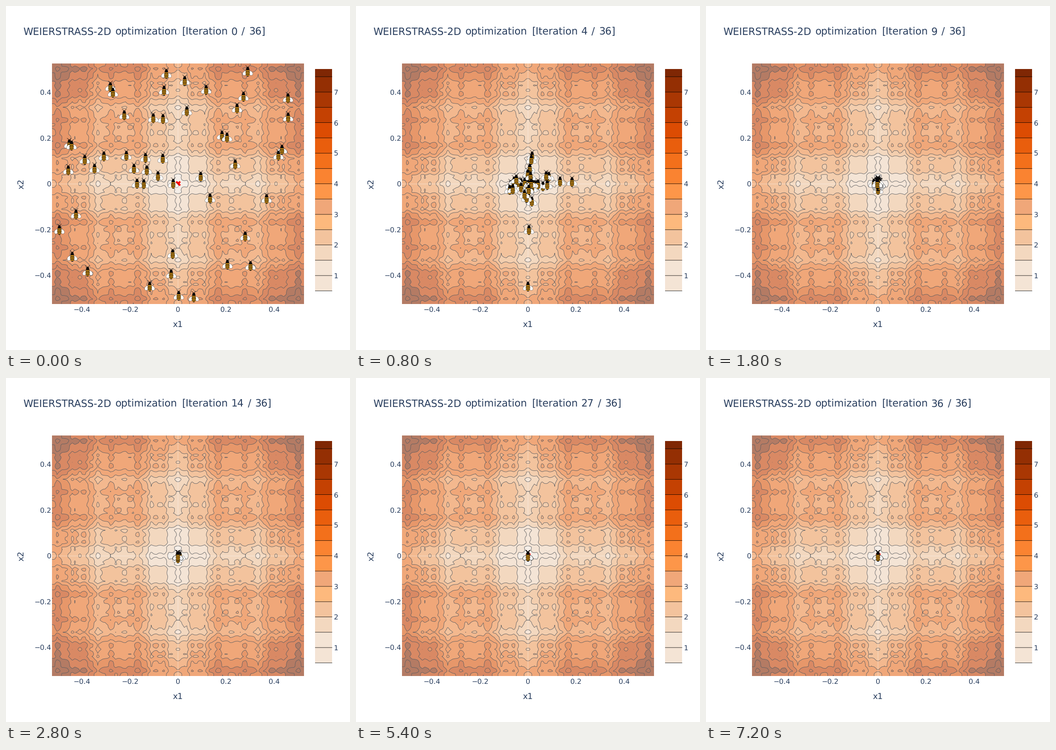
A matplotlib script for the animation above (7.4 s loop, 748 px wide and 748 px high).

```python
import numpy as np
import matplotlib.pyplot as plt
from matplotlib.animation import FuncAnimation
from matplotlib.collections import PathCollection
from matplotlib.colors import LinearSegmentedColormap
from matplotlib.patches import PathPatch, Polygon, Rectangle
from matplotlib.path import Path
from matplotlib.transforms import Affine2D

plt.rcParams["path.simplify"] = False
plt.rcParams["font.family"] = "DejaVu Sans"
plt.rcParams["text.hinting"] = "none"

SIZE, DPI = 748, 100
STEPS, STEP_MS = 36, 200
LEFT, RIGHT, TOP, BOTTOM = 100, 648, 125, 648
CX, CY, SX, SY = 373.9, 386.5, 522.2, 498.1
INK = "#2a3f5f"
PANEL = np.array([229, 236, 246]) / 255
OPACITY = 0.6
LEVELS = np.arange(0.5, 7.6, 0.5)


def pt(px):
    """Pixels to points."""
    return px * 72 / DPI


fig = plt.figure(figsize=(SIZE / DPI, SIZE / DPI), dpi=DPI, facecolor="white")
ax = fig.add_axes([0, 0, 1, 1])
ax.set_xlim(0, SIZE)
ax.set_ylim(SIZE, 0)
ax.axis("off")


def label(x, y, text, px, **kw):
    return ax.text(x, y, text, fontsize=pt(px), color=INK, va="baseline", **kw)


# ---------- colours ----------
oranges = LinearSegmentedColormap.from_list("oranges", [
    "#fff5eb", "#fee6ce", "#fdd0a2", "#fdae6b", "#fd8d3c",
    "#f16913", "#d94801", "#a63603", "#7f2704"], N=1024)
bands = oranges(np.linspace(0, 1, len(LEVELS) + 1))[:, :3]
muted = OPACITY * bands + (1 - OPACITY) * PANEL
for first, last in ((2, 3), (8, 9), (11, 12), (13, 15)):
    # Neighbouring bands share one tint.
    muted[first:last + 1] = muted[first:last + 1].mean(axis=0)
line_color = (1 - OPACITY) * PANEL


# ---------- Weierstrass surface ----------
def weierstrass(x, a=0.5, b=3, kmax=20):
    k = np.arange(kmax + 1)[:, None]
    waves = a**k * np.cos(2 * np.pi * b**k * (x + 0.5))
    floor = a**k * np.cos(np.pi * b**k)
    return (waves - floor).sum(axis=0)


def smooth_ring(p):
    """Closed centripetal Catmull-Rom curve through the points p."""
    p = p[np.hypot(*(p - np.roll(p, 1, axis=0)).T) > 1e-4]
    if len(p) < 3:
        return None
    d1 = np.roll(p, 1, axis=0) - p
    d2 = np.roll(p, -1, axis=0) - p
    a1 = np.sqrt(np.hypot(*d1.T))[:, None]
    a2 = np.sqrt(np.hypot(*d2.T))[:, None]
    num = a2**2 * d1 - a1**2 * d2
    before = p + num / (3 * a2 * (a1 + a2))
    after = p - num / (3 * a1 * (a1 + a2))
    curve = np.stack([after, np.roll(before, -1, axis=0),
                      np.roll(p, -1, axis=0)], axis=1).reshape(-1, 2)
    codes = [Path.MOVETO] + [Path.CURVE4] * len(curve)
    return Path(np.vstack([p[:1], curve]), codes)


def draw_surface():
    axis = np.linspace(-0.525, 0.525, 100)
    step = axis[1] - axis[0]
    w = weierstrass(axis)
    # One extra cell all round keeps closing edges outside the clip box.
    z = np.pad(w[None, :] + w[:, None], 1, mode="edge")
    wide = np.concatenate([[axis[0] - step], axis, [axis[-1] + step]])
    box = Rectangle((LEFT, TOP), RIGHT - LEFT, BOTTOM - TOP,
                    fc=muted[0], ec="none", zorder=1)
    ax.add_patch(box)
    for i, level in enumerate(LEVELS, 1):
        filled = ax.contourf(CX + SX * wide, CY - SY * wide, z, [level, 99])
        polygons = filled.get_paths()[0].to_polygons()
        filled.remove()
        rings = [r for r in map(smooth_ring, polygons) if r is not None]
        if rings:
            patch = PathPatch(Path.make_compound_path(*rings), fc=muted[i],
                              ec=line_color, lw=pt(0.85), zorder=1 + i / 100)
            ax.add_patch(patch)
            patch.set_clip_path(box)
    zero = dict(color="white", alpha=0.22, lw=pt(2), zorder=1.5,
                solid_capstyle="butt")
    ax.plot([LEFT, RIGHT], [CY, CY], **zero)
    ax.plot([CX, CX], [TOP, BOTTOM], **zero)


def draw_axes():
    for v in (-0.4, -0.2, 0, 0.2, 0.4):
        text = f"{v:g}".replace("-", "\u2212")
        label(CX + SX * v, 664.5, text, 15.2, ha="center")
        label(98.5, CY - SY * v + 5.5, text, 15.2, ha="right")
    label(CX, 698, "x1", 18.2, ha="center")
    label(38.5, CY, "x2", 18.2, ha="center", rotation=90,
          rotation_mode="anchor")


def draw_colorbar():
    def bar_y(v):
        return 586.1 - 66.5 * (v - 1)

    softened = {1: 2, 2: 3, 3: 4, 4: 6, 6: 9}
    for i, level in enumerate(LEVELS, 1):
        top = bar_y(min(level + 0.5, 7.75))
        color = muted[softened[i]] if i in softened else bands[i]
        ax.add_patch(Rectangle((672, top), 37.3, bar_y(level) - top,
                               fc=color, ec="none", zorder=2))
        ax.plot([672, 709.3], [bar_y(level)] * 2, color="black", snap=False,
                lw=pt(0.8), zorder=3, solid_capstyle="butt")
    for v in range(1, 8):
        label(712.5, bar_y(v) + 5.7, str(v), 15.2)


def draw_optimum():
    quarter = np.array([(0, 1), (1, 2), (2, 1)])
    turn = np.array([[0, -1], [1, 0]])
    cross = np.vstack([quarter @ np.linalg.matrix_power(turn, k)
                       for k in range(4)])
    ax.add_patch(Polygon(cross * 2.83 + (374.5, 386), fc="red", ec="none",
                         zorder=4))


# ---------- bees ----------
def ellipse(x, y, rx, ry, angle=0):
    move = Affine2D().scale(rx, ry).rotate_deg(angle).translate(x, y)
    return Path.unit_circle().transformed(move)


def stripe(y):
    half = 4.5 * np.sqrt(1 - ((y - 3.8) / 8.4)**2) - 0.2
    s = np.linspace(-1, 1, 9)
    arc = 0.6 * (1 - s**2)
    upper = np.column_stack([s * half, y - 1.2 + arc])
    lower = np.column_stack([s * half, y + 0.6 + arc])[::-1]
    return Path(np.vstack([upper, lower]))


def feeler(side):
    return Path([(side, -8), (side * 2.2, -10.3), (side * 5, -12)])


def bee_parts():
    """Path, fill, outline and outline width of each part, back to front."""
    black, outline, honey = "#0a0808", "#333333", "#ffb01a"
    parts = []
    for side in (-1, 1):
        wing = ellipse(side * 6.2, 4.6, 5.6, 4.1, side * 48)
        parts += [(wing, "white", outline, 0.4),
                  (feeler(side), "none", black, 0.7)]
    for y, rx, ry in ((3.8, 4.6, 8.2), (-3, 3.9, 3.2), (-6.6, 2.9, 2.5)):
        parts.append((ellipse(0, y, rx, ry), black, "none", 0))
    for y in np.linspace(-1, 9, 4):
        parts.append((stripe(y), honey, "none", 0))
    return parts


def forage(count=50):
    """Bee positions per step: each bee tries a new value for one coordinate
    near the optimum and keeps it when the surface is lower there."""
    rng = np.random.RandomState(1234)
    bees = rng.uniform(-0.5, 0.5, (count, 2))
    history = [bees.copy()]
    rows = np.arange(count)
    for step in range(1, STEPS + 1):
        axis = rng.randint(2, size=count)
        trial = rng.laplace(0, 0.055 * np.exp(-(step / 5)**2), count)
        now = bees[rows, axis]
        better = weierstrass(trial) < weierstrass(now)
        bees[rows, axis] = np.where(better, trial, now)
        history.append(bees.copy())
    return np.array(history) * (SX, -SY) + (CX, CY)


# ---------- scene ----------
draw_surface()
draw_axes()
draw_colorbar()
draw_optimum()

swarm = forage()
paths, faces, edges, widths = zip(*bee_parts())


def part_offsets(step):
    return np.repeat(swarm[step], len(paths), axis=0)


bees = PathCollection(paths, sizes=None, facecolors=faces, edgecolors=edges,
                      linewidths=[pt(w) for w in widths],
                      offsets=part_offsets(0), offset_transform=ax.transData,
                      transform=Affine2D().scale(1, -1), zorder=5)
ax.add_collection(bees, autolim=False)

TITLE_PX, TITLE_Y = 21.6, 62.4
SLASH_X, TOTAL_X = 512, 528
label(37.6, TITLE_Y, "WEIERSTRASS-2D", TITLE_PX)
label(238, TITLE_Y, "optimization", TITLE_PX)
label(482, TITLE_Y, "[Iteration", TITLE_PX, ha="right")
counter = label(489.8, TITLE_Y, "0", TITLE_PX)
slash = label(SLASH_X, TITLE_Y, "/", TITLE_PX)
total = label(TOTAL_X, TITLE_Y, f"{STEPS}]", TITLE_PX)


def update(step):
    bees.set_offsets(part_offsets(step))
    shift = 13.6 * (len(str(step)) - 1)
    counter.set_text(str(step))
    slash.set_x(SLASH_X + shift)
    total.set_x(TOTAL_X + shift)
    return bees, counter, slash, total


anim = FuncAnimation(fig, update, frames=STEPS + 1, interval=STEP_MS,
                     init_func=lambda: update(0), repeat=True, blit=False)
plt.show()
```
